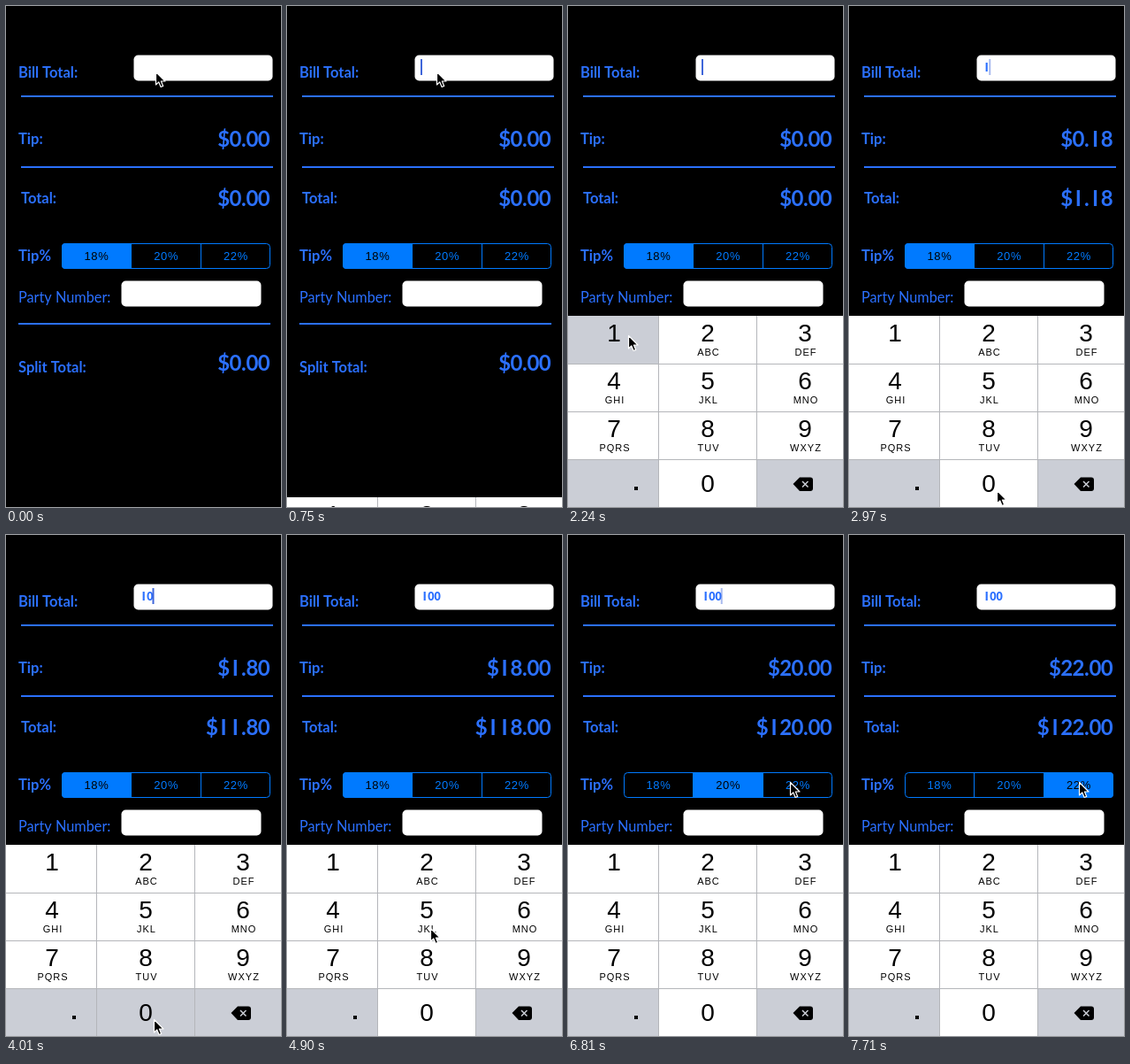
An HTML page with a canvas that plays this animation: 311 px wide and 566 px high, repeating every 8000 ms.

```html
<!DOCTYPE html>
<html lang="en">
<head>
<meta charset="utf-8">
<title>Tip calculator</title>
<style>
  html, body { margin: 0; width: 100%; height: 100%; overflow: hidden; background: #000; }
  canvas { display: block; width: 311px; height: 566px; }
</style>
</head>
<body>
<canvas id="stage" width="311" height="566"></canvas>
<script>
const ctx = document.getElementById('stage').getContext('2d');
const LOOP = 8000, TICK = 147.95, TICK_START = 6;
const BLUE = '#2b70ff', TINT = '#007aff', KEY_GRAY = '#cbced6', RULE = '#b4b6ba';
const LABEL = 'Lato, sans-serif', KEYPAD = '"Liberation Sans", Arial, sans-serif';

// All timeline positions below are in ticks.
const pointerPath = [
  [7, 169, 74], [10, 67, 375], [12, 67, 375], [13, 68, 372], [16, 68, 372],
  [18, 166, 544], [19, 166, 544], [20, 167, 547], [30, 167, 547],
  [34, 161, 425], [38, 169, 285], [39, 174, 279], [41, 174, 279], [46, 260, 279]
];
const entries = [[0, ''], [16, '1'], [26, '10'], [28, '100']];
const caretStarts = [[0, 6], [16, 16.7], [26, 26], [28, 28]];
const selections = [[0, 0], [41, 1], [50, 2]];
const touches = [[39, 41, 1], [48, 50, 2]];
const keyPresses = [[15, 16, '1'], [23, 26, '0'], [27, 28, '0']];
const rates = [18, 20, 22];
const keyLetters = ['', 'ABC', 'DEF', 'GHI', 'JKL', 'MNO', 'PQRS', 'TUV', 'WXYZ'];
const columns = [[0, 102, 52], [103, 110, 158], [214, 97, 268]];

const latest = (list, k) => list.filter(([start]) => start <= k).pop()[1];
const active = (list, k) => list.find(([start, end]) => k >= start && k < end)?.[2];

function rect(x, y, w, h, color) {
  ctx.fillStyle = color;
  ctx.fillRect(x, y, w, h);
}

function roundRect(x, y, w, h, r, color) {
  ctx.beginPath();
  ctx.roundRect(x, y, w, h, r);
  ctx.fillStyle = color;
  ctx.fill();
}

function text(str, x, y, font, color, align = 'left', spacing = 0) {
  ctx.font = font;
  ctx.fillStyle = color;
  ctx.textAlign = align;
  ctx.letterSpacing = spacing + 'px';
  ctx.fillText(str, x, y);
}

// Tabular figures whose "1" is a plain stem.
function figures(str, right, y, font, cell) {
  let x = right;
  for (const ch of [...str].reverse()) {
    const w = ch === '.' ? cell * 0.45 : cell;
    text(ch === '1' ? 'I' : ch, x - w / 2, y, font, BLUE, 'center');
    x -= w;
  }
}

function pointerAt(k) {
  const next = pointerPath.findIndex(([tick]) => tick > k);
  if (next === 0) return pointerPath[0].slice(1);
  if (next < 0) return pointerPath.at(-1).slice(1);
  const [k0, x0, y0] = pointerPath[next - 1], [k1, x1, y1] = pointerPath[next];
  const u = (k - k0) / (k1 - k0), e = u * u * (3 - 2 * u);
  return [x0 + (x1 - x0) * e, y0 + (y1 - y0) * e];
}

function caretAlpha(k) {
  if (k < 5) return 0;
  const p = Math.max(0, k - latest(caretStarts, k)) % 6.75;
  return p < 2.9 ? 1 : p < 3.6 ? 0.45 : p < 5.9 ? 0 : p < 6.6 ? 0.5 : 1;
}

function drawForm(k) {
  const bold = `bold 16.5px ${LABEL}`;
  const entry = latest(entries, k);
  const bill = Number(entry), tip = bill * rates[latest(selections, k)] / 100;

  text('Bill Total:', 14, 81, bold, BLUE);
  text('Tip:', 14, 156, bold, BLUE);
  text('Total:', 17, 223, bold, BLUE);
  text('Tip%', 14, 288, bold, BLUE);
  text('Party Number:', 14, 335, `16.3px ${LABEL}`, BLUE);
  text('Split Total:', 14, 414, bold, BLUE);

  rect(17, 101, 285, 2, BLUE);
  rect(17, 181, 285, 2, BLUE);
  rect(14, 358, 285, 2, BLUE);

  const money = (value, y) =>
    figures('$' + value.toFixed(2), 298.3, y, `bold 24px ${LABEL}`, 13.2);
  money(tip, 159);
  money(bill + tip, 226);
  money(0, 412);

  roundRect(144.5, 55.5, 157, 29, 5, '#fff');
  roundRect(130.5, 310.5, 158, 29, 5, '#fff');
  figures(entry, 152 + 7.25 * entry.length, 74, `900 12.5px ${LABEL}`, 7.25);
  ctx.globalAlpha = caretAlpha(k);
  rect(151 + 7.25 * entry.length, 60, 2, 18, '#3f66d9');
  ctx.globalAlpha = 1;
}

function drawSegments(k) {
  const edges = [63, 141.5, 220.5, 299];
  const selected = latest(selections, k), touched = active(touches, k);
  ctx.save();
  ctx.beginPath();
  ctx.roundRect(63, 268, 236, 29, 4);
  ctx.clip();
  rates.forEach((rate, i) => {
    const x = edges[i], w = edges[i + 1] - x;
    if (i === selected) rect(x, 268, w, 29, TINT);
    else if (i === touched) rect(x, 268, w, 29, '#001326');
    text(rate + '%', x + w / 2 + 0.2, 287, `13px ${KEYPAD}`, i === selected ? '#000' : TINT, 'center', 0.6);
  });
  ctx.restore();
  rect(141, 268, 1, 29, TINT);
  rect(220, 268, 1, 29, TINT);
  ctx.strokeStyle = TINT;
  ctx.lineWidth = 1;
  ctx.beginPath();
  ctx.roundRect(63.5, 268.5, 235, 28, 4);
  ctx.stroke();
}

function drawBackspace() {
  ctx.fillStyle = '#000';
  ctx.beginPath();
  ctx.moveTo(254.5, 540);
  ctx.lineTo(262, 532.5);
  ctx.lineTo(274, 532.5);
  ctx.quadraticCurveTo(277, 532.5, 277, 535.5);
  ctx.lineTo(277, 545);
  ctx.quadraticCurveTo(277, 548, 274, 548);
  ctx.lineTo(262, 548);
  ctx.closePath();
  ctx.fill();
  ctx.strokeStyle = KEY_GRAY;
  ctx.lineWidth = 1.5;
  ctx.beginPath();
  ctx.moveTo(265, 537); ctx.lineTo(271.5, 543.5);
  ctx.moveTo(271.5, 537); ctx.lineTo(265, 543.5);
  ctx.stroke();
}

function drawKeypad(k) {
  if (k < 5) return;
  const pressed = active(keyPresses, k);
  ctx.save();
  ctx.translate(0, Math.round(216 * Math.exp(-1.76 * (k - 4.97))));
  rect(0, 350, 311, 216, RULE);
  for (let i = 0; i < 12; i++) {
    const row = Math.floor(i / 3), [x, w, center] = columns[i % 3];
    const digit = i < 9 ? String(i + 1) : i === 10 ? '0' : '';
    const top = row ? 351 + 54 * row : 350;
    rect(x, top, w, 404 + 54 * row - top, !digit || digit === pressed ? KEY_GRAY : '#fff');
    const baseline = row === 3 ? 549 : 379 + 54 * row;
    text(digit, center, baseline, `28px ${KEYPAD}`, '#000', 'center');
    if (i < 9) text(keyLetters[i], center + 1, baseline + 16, `11px ${KEYPAD}`, '#000', 'center', 1);
  }
  rect(75, 543, 4, 4, '#000');
  drawBackspace();
  ctx.restore();
}

function drawPointer(k) {
  const [x, y] = pointerAt(k);
  ctx.save();
  ctx.translate(Math.round(x) + 0.5, Math.round(y) + 0.5);
  ctx.beginPath();
  [[0, 0], [0, 14.5], [3.3, 11.4], [5.6, 17], [8.2, 15.9], [5.9, 10.5], [10.5, 10.5]]
    .forEach(([px, py]) => ctx.lineTo(px, py));
  ctx.closePath();
  ctx.fillStyle = '#000';
  ctx.fill();
  ctx.strokeStyle = '#fff';
  ctx.lineWidth = 1.2;
  ctx.lineJoin = 'round';
  ctx.stroke();
  ctx.restore();
}

function frame() {
  const time = performance.now() % LOOP;
  const k = Math.max(0, Math.floor((time - TICK_START) / TICK));
  rect(0, 0, 311, 566, '#000');
  drawForm(k);
  drawSegments(k);
  drawKeypad(k);
  drawPointer(k);
  requestAnimationFrame(frame);
}
frame();
</script>
</body>
</html>
```
